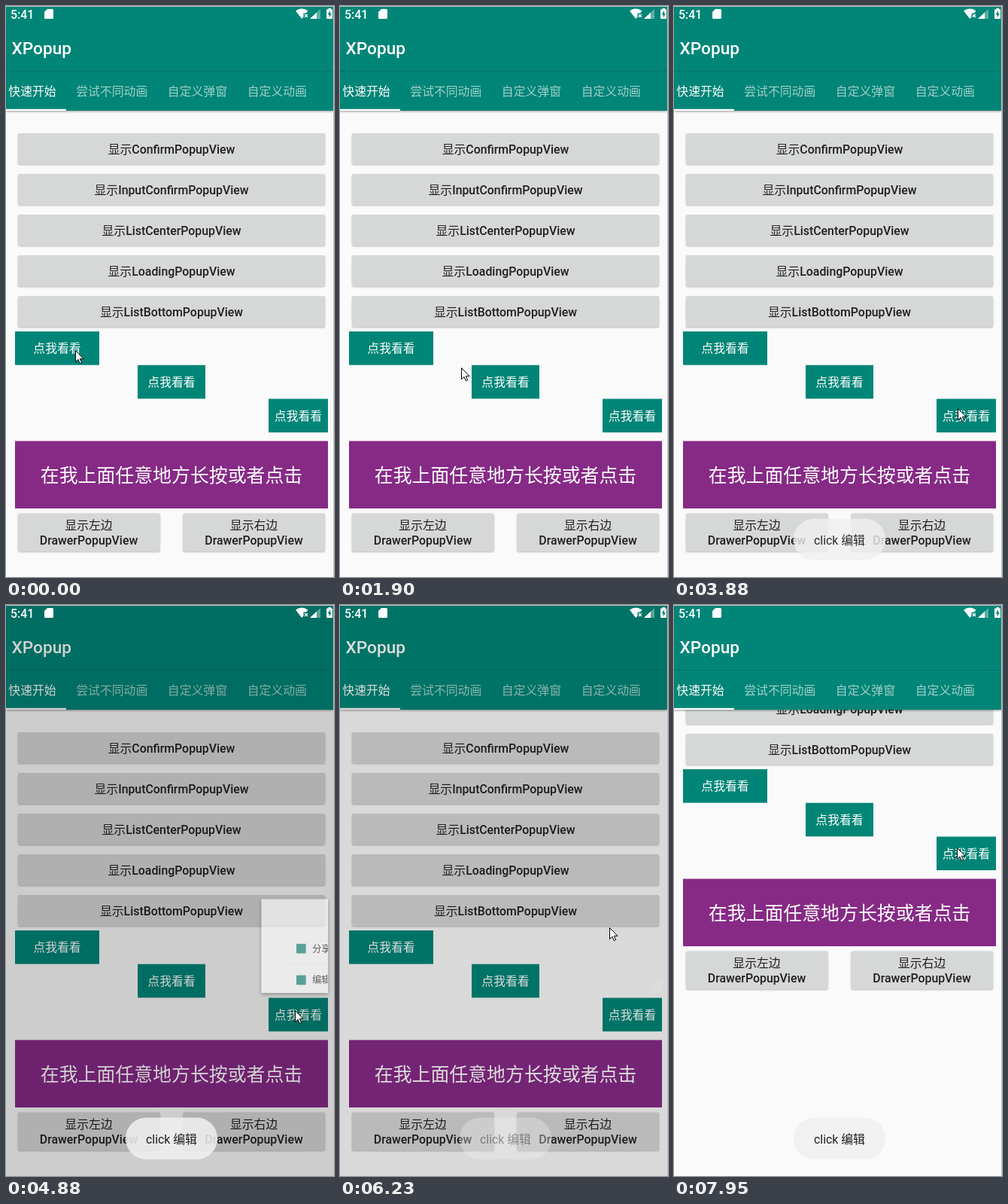
An HTML page that plays this animation: 436x758 px, repeating every 8000 ms.

```html
<!DOCTYPE html>
<html lang="zh-CN">
<meta charset="utf-8">
<title>XPopup</title>
<style>
  html, body { margin: 0; width: 100%; height: 100%; overflow: hidden; background: #fafafa; }
  svg { display: block; width: 436px; height: 758px; }
  text { font: 15.85px Roboto, "Noto Sans CJK SC", "Noto Sans CJK", sans-serif; fill: #1f1f1f; }
  .med { font-weight: 500; }
  .mid { text-anchor: middle; }
  .white { fill: #fff; }
  .item { font-size: 19px; }
  .raised { fill: #d6d7d7; filter: drop-shadow(0 1px 1.2px #0004); }
  .popup { filter: drop-shadow(0 3px 4px #0007); }
  .header { filter: drop-shadow(0 1px 1.5px #0006); }
</style>
<body>
<svg id="stage" viewBox="0 0 436 758"></svg>
<script>
const LOOP = 8000, TEAL = '#008577', W = 139.5, H = 196, DURATION = 360;
const stage = document.getElementById('stage');

// ---- Markup helpers ----
const rect = (x, y, w, h, attrs) => `<rect x="${x}" y="${y}" width="${w}" height="${h}" ${attrs}/>`;
// Latin words are set in medium weight, Chinese in regular.
const mixed = s => s.replace(/[A-Za-z]+/g, '<tspan class="med">$&</tspan>');
const text = (x, y, s, cls = '', attrs = '') => `<text x="${x}" y="${y}" class="${cls}" ${attrs}>${s}</text>`;
const label = (x, y, s) => text(x, y, mixed(s), 'mid');
const raised = (x, y, w, h) => rect(x, y, w, h, 'rx="2" class="raised"');
const tile = (x, y, w) => rect(x, y, w, 44.6, `fill="${TEAL}"`) + text(x + w / 2, y + 28, '点我看看', 'mid white');

// ---- Scene parts ----
const page = ['Confirm', 'InputConfirm', 'ListCenter', 'Loading', 'ListBottom']
  .map((name, i) => raised(16, 169 + 54 * i, 408, 41) + label(220, 195.5 + 54 * i, `显示${name}PopupView`)).join('')
  + tile(12, 432, 112) + tile(175, 476.7, 90) + tile(349, 521.5, 79)
  + rect(12, 577.5, 416, 89.5, 'fill="#862a86"')
  + text(220, 632, '在我上面任意地方长按或者点击', 'mid white', 'style="font-size:24.9px"')
  + [[16, '左'], [235.5, '右']].map(([x, side]) => raised(x, 673.5, 188.5, 50.5)
    + label(x + 94, 694.5, `显示${side}边`) + label(x + 94, 714.5, 'DrawerPopupView')).join('');

const header = rect(0, 1, 435, 138, `fill="${TEAL}" class="header"`)
  + rect(0, 86, 435, 1, 'fill="#0002"')
  + text(7.5, 64, 'XPopup', 'med white', 'style="font-size:22.6px"')
  + [[3.3, '快速开始'], [93.2, '尝试不同动画'], [214.8, '自定义弹窗'], [320.7, '自定义动画']]
    .map(([x, s], i) => text(x, 119, s, 'white', i ? 'opacity=".62"' : '')).join('')
  + rect(0, 136.8, 80, 2.2, 'fill="#fff"');

const status = text(6, 16.8, '5:41', 'med white') + `<g fill="#fff">
  <path d="M55 4H61.5Q63 4 63 5.5V15.5Q63 17 61.5 17H52.5Q51 17 51 15.5V8Z"/>
  <path d="M385 6.5Q393 .5 401.500 6.500L399 9.500H395.500V14.500L393.200 17Z"/>
  <path d="M418 4V17H404Z" opacity=".35"/><path d="M413 8.600V17H404Z"/>
  <path d="M428.500 3H432V4.500H434V17H426V4.500H428.500Z"/></g>
  <path d="M397 11l4 4m0-4l-4 4" stroke="#fff" stroke-width="1.300"/>
  <path d="M431 6L427.500 11.500H429.700V15.500L432.800 10H431Z" fill="${TEAL}"/>`;

const icon = y => rect(22.5, y, 20, 20, 'rx="1" fill="#15897b"');
const popup = `<g id="popup" class="popup">${rect(0, 0, W, H, 'fill="#fdfdfd"')}
  <g clip-path="url(#box)"><g id="items">${icon(22)}${icon(87.5)}
  ${text(56, 39, '分享', 'item')}${text(56, 104.5, '编辑', 'item')}${text(20.5, 170, '不带icon', 'item')}
  ${rect(0, 64.5, W, 1, 'fill="#e6e6e6"')}${rect(0, 129.5, W, 1, 'fill="#e6e6e6"')}</g></g></g>`;

const toast = `<g id="toast">${rect(159, 680.5, 122, 55.5, 'rx="27.7" fill="#f0f0f0" fill-opacity=".86"')}
  ${text(220, 714.5, 'click 编辑', 'mid')}</g>`;

stage.innerHTML = `<clipPath id="box">${rect(0, 0, W, H, '')}</clipPath>
  ${rect(0, 0, 436, 758, 'fill="#fafafa"')}
  <g id="page">${page}</g>${header}
  ${rect(0, 1, 435, 757, 'id="shade"')}${status}${popup}${toast}
  <path id="cursor" d="M.5 .5V15.500L4 12.200L6.300 17.500L8.600 16.500L6.300 11.300H11Z" fill="#fff" stroke="#000"/>
  <path d="M0 .5H435.500V758" fill="none" stroke="#c4c4c4"/>`;
const part = Object.fromEntries([...stage.querySelectorAll('g[id], rect[id], path[id]')].map(e => [e.id, e]));

// ---- Motion ----
const clamp = v => Math.min(1, Math.max(0, v));
const accelDecel = v => (1 - Math.cos(Math.PI * v)) / 2;

// cubic-bezier(.4, 0, .2, 1)
function fastOutSlowIn(v) {
  let lo = 0, hi = 1, s;
  for (let i = 0; i < 24; i++) {
    s = (lo + hi) / 2;
    if (1.2 * s * (1 - s) ** 2 + .6 * s * s * (1 - s) + s ** 3 < v) lo = s; else hi = s;
  }
  return 3 * s * s - 2 * s ** 3;
}

// keys: [time, ...values]
function track(t, keys) {
  const i = keys.findIndex(k => k[0] > t);
  if (i < 0) return keys.at(-1).slice(1);
  if (!i) return keys[0].slice(1);
  const a = keys[i - 1], b = keys[i], f = (t - a[0]) / (b[0] - a[0]);
  return a.slice(1).map((v, j) => v + (b[j + 1] - v) * f);
}

// Popups grow from a corner: (x, y) is the box, (px, py) the corner as 0 or 1.
const popups = [
  { open: 402, close: 1353, x: 12, y: 483.5, px: 0, py: 0 },
  { open: 2202, close: 3190, x: 125.5, y: 528.5, px: 1, py: 0 },
  { open: 4732, close: 5994, x: 288.5, y: 319, px: 1, py: 1 }
];
const toasts = [{ from: 3500, to: 5380 }, { from: 6120, to: LOOP }];
const cursorKeys = [
  [1550, 92, 457], [2080, 228, 502], [2350, 228, 502], [2620, 232, 548], [2980, 203, 607],
  [3070, 198, 613], [3250, 198, 613], [3880, 377, 534], [3970, 379, 534], [4150, 384, 538],
  [5330, 384, 538], [5780, 358, 428], [6780, 358, 428], [7050, 374, 536], [7500, 376, 334],
  [7590, 376, 334], [7950, 376, 322]
];
const scrollKeys = [[7050, 0], [7500, 202], [7590, 202], [7950, 214]];

// The screen refreshes every 90 ms, counted anew from each of these times.
const ticks = [10, 1380, 1460, 2080, 4790, 6870];
function snap(t) {
  const start = ticks.findLast(s => s <= t) ?? 0;
  return start + Math.floor((t - start) / 90) * 90;
}

function draw(time) {
  const t = snap(time);
  const p = popups.findLast(q => t >= q.open) || popups[0];
  const shown = ease => ease(clamp((t - p.open) / DURATION)) - ease(clamp((t - p.close) / DURATION));
  const f = shown(fastOutSlowIn);
  const x = p.x + p.px * W * (1 - f), y = p.y + p.py * H * (1 - f);
  part.popup.setAttribute('transform', `translate(${x} ${y}) scale(${f})`);
  part.popup.setAttribute('opacity', f);
  part.popup.setAttribute('visibility', f > .001 ? 'visible' : 'hidden');
  part.items.setAttribute('transform',
    `translate(${(2 * p.px - 1) * (1 - f) * W} ${(2 * p.py - 1) * (1 - f) * H})`);
  part.shade.setAttribute('opacity', .498 * shown(accelDecel));

  const alpha = toasts.reduce((sum, { from, to }) =>
    sum + 1 - (1 - clamp((t - from) / 500)) ** 2 - clamp((t - to) / 400) ** 2, 0);
  part.toast.setAttribute('opacity', clamp(alpha));

  part.page.setAttribute('transform', `translate(0 ${-track(t, scrollKeys)[0]})`);
  part.cursor.setAttribute('transform', `translate(${track(t, cursorKeys).map(Math.round)})`);
}

function loop() {
  draw(performance.now() % LOOP);
  requestAnimationFrame(loop);
}
loop();
</script>
</body>
</html>
```
